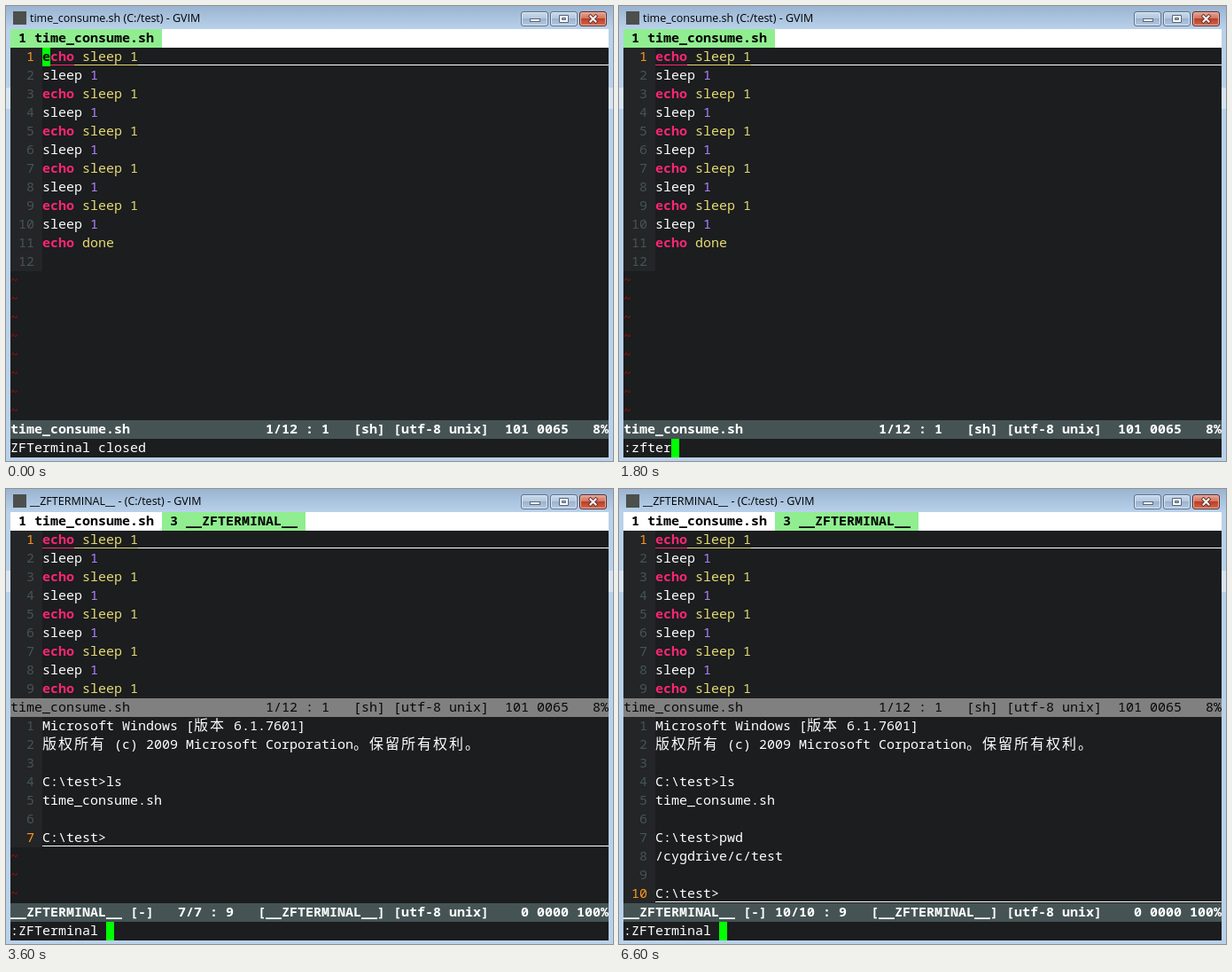
An HTML page that plays this animation: 685 by 513 pixels, repeating every 8 s.

```html
<!DOCTYPE html>
<html lang="en">
<head>
<meta charset="utf-8">
<title>Terminal in an editor</title>
<style>
  html, body { margin: 0; width: 100%; height: 100%; overflow: hidden; }
  #stage {
    position: relative; width: 685px; height: 513px; overflow: hidden;
    background: linear-gradient(#9ab4d1, #b9d1ea 26px);
  }
  #stage > *, #screen > * { position: absolute; box-sizing: border-box; }
  .glow { left: 0; top: 92px; width: 685px; height: 24px; background: #d6e4f3; }
  .icon { left: 8px; top: 6px; width: 15px; height: 15px; background: #4c4f4c; }
  #title {
    left: 27px; top: 1px; white-space: pre; color: #000;
    font: 12.5px/26px "Open Sans", "Noto Sans", sans-serif;
  }
  .button {
    top: 6px; width: 31px; height: 17px; border: 1px solid #5d7089; border-radius: 3px;
    background: linear-gradient(#c8d8ea, #b5c9df 45%, #9bb3ce 50%, #b4cae2);
    box-shadow: inset 0 0 0 1px #dce8f4;
  }
  .close {
    border-color: #5e2a2a;
    background: linear-gradient(#e2a493, #d27661 45%, #bd3d24 50%, #cf6a4b);
    box-shadow: inset 0 0 0 1px #e9b5a6;
  }
  .button svg { display: block; width: 29px; height: 15px; }
  #screen { left: 5px; top: 26px; width: 675px; height: 483px; background: #1b1d1e; }
  .cell {
    height: 21px; white-space: pre; color: #fff;
    font: 15px/18px "Noto Sans Mono", "Liberation Mono", monospace;
  }
  .cjk { font: 16px/0 "Noto Sans CJK SC", "Noto Sans CJK", sans-serif; letter-spacing: 2px; }
  .line { height: 1px; background: #fff; }
  .num { color: #465457; background: #232526; }
  .now { color: #fd971f; }
  .key { color: #f92672; font-weight: bold; }
  .str { color: #e6db74; }
  .int { color: #ae81ff; }
  .tilde { color: #a00c0c; }
  .tab { color: #000; background: #fff; font-weight: bold; }
  .open { background: #90ee90; }
  .status { background: #455354; font-weight: bold; }
  .idle { color: #080808; background: #808080; }
  .cursor { color: #000; background: #0f0; font-weight: bold; }
</style>
</head>
<body>
<div id="stage">
  <div class="glow"></div>
  <div class="icon"></div>
  <div id="title"></div>
  <div class="button" style="left:581px"><svg><rect x="9.5" y="7.5" width="11" height="3" fill="#fff" stroke="#566579"/></svg></div>
  <div class="button" style="left:614px"><svg><path d="M9.5 3.5h10v8h-10zM12.5 6.5h4v2h-4z" fill="#fff" fill-rule="evenodd" stroke="#566579"/></svg></div>
  <div class="button close" style="left:647px"><svg><g fill="none" stroke-linecap="square"><path id="x" d="M11.5 4.5l6 6m0-6l-6 6" stroke="#6b3432" stroke-width="4"/><path d="M11.5 4.5l6 6m0-6l-6 6" stroke="#fff" stroke-width="2"/></g></svg></div>
  <div id="screen"></div>
</div>
<script>
const LOOP = 8000, CELL = 9, ROW = 21, COLS = 75;
const screenBox = document.getElementById('screen');
const titleBox = document.getElementById('title');

// Start time of each state and the command line it shows
const steps = [
  [0, 'ZFTerminal closed'], [300, 'ZFTerminal closed'],
  [600, ':z'], [900, ':zf'], [1200, ':zft'], [1500, ':zfte'], [1800, ':zfter'],
  [2100, ':ZFTerminal'], [2400, ':ZFTerminal '], [2700, ':ZFTerminal l'], [3000, ':ZFTerminal ls'],
  [3600, ':ZFTerminal '], [5700, ':ZFTerminal p'], [6000, ':ZFTerminal pw'],
  [6300, ':ZFTerminal pwd'], [6600, ':ZFTerminal ']
];

const listing = [
  'Microsoft Windows [版本 6.1.7601]',
  '版权所有 (c) 2009 Microsoft Corporation。保留所有权利。',
  '', 'C:\\test>ls', 'time_consume.sh', '', 'C:\\test>'
];
const listingAfterPwd = [...listing.slice(0, 6), 'C:\\test>pwd', '/cygdrive/c/test', '', 'C:\\test>'];

function add(className, col, row, html, cols) {
  const el = document.createElement('div');
  el.className = className;
  el.style.left = col * CELL + 'px';
  el.style.top = row * ROW + 'px';
  if (cols) el.style.width = cols * CELL + 'px';
  el.innerHTML = html;
  screenBox.append(el);
  return el;
}

const put = (style, col, row, text, cols) => add('cell ' + style, col, row,
  text.replace(/</g, '&lt;').replace(/[\u3000-\u9fff]+/g, '<span class="cjk">$&</span>'), cols);

function underline(col, row, cols, color = '#fff') {
  const el = add('line', col, row, '', cols);
  el.style.marginTop = '19px';
  el.style.background = color;
}

function lineNumber(n, row, current) {
  put(current ? 'num now' : 'num', 0, row, String(n).padStart(3) + ' ', 4);
}

function script(count) {
  for (let n = 1; n <= count; n++) {
    lineNumber(n, n, n === 1);
    if (n === 12) continue;
    if (n % 2) {
      put('key', 4, n, 'echo');
      put('str', 9, n, n === 11 ? 'done' : 'sleep 1');
    } else {
      put('', 4, n, 'sleep');
      put('int', 10, n, '1');
    }
  }
  underline(4, 1, 71);
  underline(4, 1, 4, '#f92672');
  underline(8, 1, 8, '#e6db74');
}

function tildes(from) {
  for (let row = from; row <= 20; row++) put('tilde', 0, row, '~');
}

function statusLine(style, row, parts) {
  const text = parts.reduce((line, [col, part]) => line.padEnd(col) + part, '');
  put('status ' + style, 0, row, text, COLS).style.fontWeight = style ? 'normal' : 'bold';
}

const scriptStatus = [
  [0, 'time_consume.sh'], [32, '1/12 : 1'], [43, '[sh]'], [48, '[utf-8 unix]'], [62, '101 0065'], [73, '8%']
];

function terminal(lines) {
  const last = lines.length;
  lines.forEach((text, i) => {
    lineNumber(i + 1, 11 + i, i === last - 1);
    put('', 4, 11 + i, text);
  });
  underline(4, 10 + last, 71);
  tildes(11 + last);
  const place = `${last}/${last} : 9`;
  statusLine('', 21, [
    [0, '__ZFTERMINAL__ [-]'], [28 - place.length, place], [31, '[__ZFTERMINAL__]'],
    [48, '[utf-8 unix]'], [64, '0 0000'], [71, '100%']
  ]);
}

function draw([time, command]) {
  screenBox.replaceChildren();
  const split = time >= 3600;
  titleBox.textContent = (split ? '__ZFTERMINAL__ -' : 'time_consume.sh') + ' (C:/test) - GVIM';

  put('tab', 0, 0, '', COLS);
  put(split ? 'tab' : 'tab open', 0, 0, ' 1 time_consume.sh ', 19);
  if (split) {
    put('tab open', 19, 0, ' 3 __ZFTERMINAL__ ', 18);
    script(9);
    statusLine('idle', 10, scriptStatus);
    terminal(time >= 6600 ? listingAfterPwd : listing);
  } else {
    script(12);
    tildes(13);
    statusLine('', 21, scriptStatus);
  }

  put('', 0, 22, command);
  if (time < 600) put('cursor', 4, 1, 'e', 1);
  else put('cursor', command.length, 22, '', 1);
  if (time === 300) put('', 64, 22, ':');
}

let shown;
function tick() {
  const time = performance.now() % LOOP;
  const step = steps.findLast(([start]) => start <= time);
  if (step !== shown) draw(shown = step);
  requestAnimationFrame(tick);
}
tick();
</script>
</body>
</html>
```
